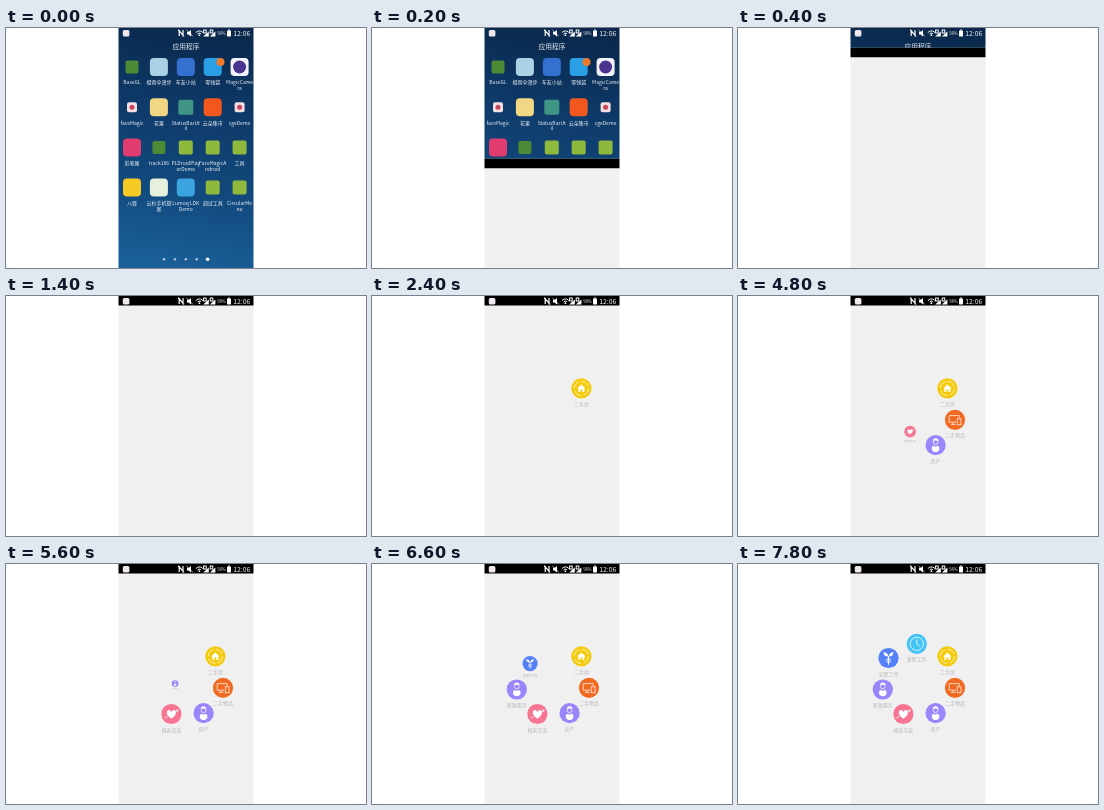
Recreate the animation shown at these times as an HTML page with a canvas. Size 360 px wide and 240 px high, loop 8000 ms.

```html
<!DOCTYPE html>
<html lang="zh">
<head>
<meta charset="utf-8">
<title>Circular menu</title>
<style>
html, body { margin: 0; width: 100%; height: 100%; overflow: hidden; background: #fff; }
canvas { display: block; width: 360px; height: 240px; }
</style>
</head>
<body>
<canvas id="stage"></canvas>
<script>
const LOOP = 8000, STEP = 200;
const LEFT = 112.5, RIGHT = 247.5, HEIGHT = 240, BAR = 9.4;
const CENTER = { x: 181, y: 116.5 };
const GROW = 350;
const FONT = '"Noto Sans CJK SC", "Noto Sans CJK", "Noto Sans", sans-serif';

const canvas = document.getElementById('stage');
const ctx = canvas.getContext('2d');
const ratio = window.devicePixelRatio || 1;
canvas.width = 360 * ratio;
canvas.height = 240 * ratio;

function text(str, x, y, size, color, weight = 400) {
  ctx.font = `${weight} ${size}px ${FONT}`;
  ctx.textAlign = 'center';
  ctx.textBaseline = 'middle';
  ctx.fillStyle = color;
  ctx.fillText(str, x, y);
}

function box(x, y, w, h, color, r = 0) {
  ctx.fillStyle = color;
  ctx.beginPath();
  ctx.roundRect(x, y, w, h, r);
  ctx.fill();
}

function disc(x, y, r, color) {
  ctx.fillStyle = color;
  ctx.beginPath();
  ctx.arc(x, y, r, 0, Math.PI * 2);
  ctx.fill();
}

function ring(x, y, r, from = 0, to = Math.PI * 2) {
  ctx.beginPath();
  ctx.arc(x, y, r, from, to);
  ctx.stroke();
}

function shape(path, fill = true) {
  const p = new Path2D(path);
  if (fill) ctx.fill(p); else ctx.stroke(p);
}

// Launcher: [label, second line, colour, size]
const GREEN = '#8fb93c', DARK_GREEN = '#4d8a35';
const apps = [
  ['BaseGL', '', DARK_GREEN, 13],
  ['橙雨伞漫步', '', '#a9d3e4', 18],
  ['车友小站', '', '#3470cf', 18],
  ['零钱袋', '', '#2b9fe6', 18],
  ['MagicCame', 'ra', '#f4f2fa', 18],
  ['faceMagic', '', '#f3dfe2', 10],
  ['花果', '', '#f1d683', 18],
  ['StatusBarUt', 'il', '#3f9484', 15],
  ['云朵集市', '', '#f2571d', 18],
  ['cgeDemo', '', '#f3dfe2', 10],
  ['彩笔屋', '', '#e23b70', 18],
  ['track186', '', DARK_GREEN, 13],
  ['PLDroidPlay', 'erDemo', GREEN, 14],
  ['FaceMagicA', 'ndroid', GREEN, 14],
  ['工具', '', GREEN, 14],
  ['八驿', '', '#f6c923', 18],
  ['云杉手机管', '家', '#e6f0dc', 18],
  ['Lumoq LDK', 'Demo', '#3ba3dd', 18],
  ['调试工具', '', GREEN, 14],
  ['CircularMe', 'nu', GREEN, 14]
];

function drawLauncher() {
  const sky = ctx.createLinearGradient(200, 0, 160, HEIGHT);
  sky.addColorStop(0, '#0a284b');
  sky.addColorStop(0.35, '#0e3a69');
  sky.addColorStop(0.7, '#124b80');
  sky.addColorStop(1, '#1a6099');
  box(112, 0, 136, HEIGHT, sky);

  text('应用程序', 180, 18.8, 6.8, '#e8edf4', 500);
  apps.forEach(([label, more, color, size], i) => {
    const x = 126 + (i % 5) * 26.9;
    const y = 39 + Math.floor(i / 5) * 40.2;
    box(x - size / 2, y - size / 2, size, size, color, size > 15 ? 4 : 2);
    text(label, x, y + 15.4, 5, '#eef3f8');
    if (more) text(more, x, y + 21.2, 5, '#eef3f8');
  });
  disc(233.6, 39, 6.5, '#4a348f');
  disc(214.5, 34, 4, '#f07a2c');
  disc(126, 79.2, 2.5, '#c9455c');
  disc(233.6, 79.2, 2.5, '#c9455c');
  for (let i = 0; i < 5; i++) {
    disc(158 + i * 10.9, 231.3, i === 4 ? 1.8 : 1.3, i === 4 ? '#fff' : '#a9c2da');
  }
}

function drawStatus() {
  ctx.strokeStyle = '#fff';
  box(116.8, 2, 6.6, 6.4, '#f0e6ee', 1.5);

  // NFC and mute
  ctx.lineWidth = 1.2;
  shape('M173.2 8V2.6L177 7.4V2M172 2.4h1.4M176.6 8h1.6', false);
  ctx.fillStyle = '#fff';
  shape('M181 4h1.5l2.5-2v6.4l-2.5-2H181z');
  ctx.lineWidth = 0.8;
  shape('M180.6 2.2l6 5.8', false);

  // Wi-Fi
  ctx.lineWidth = 1;
  for (const r of [2.2, 4.4]) ring(193.4, 7.3, r, Math.PI * 1.2, Math.PI * 1.8);
  disc(193.4, 7.2, 0.9, '#fff');

  // Two signal meters
  for (const x of [197.2, 203.8]) {
    ctx.fillStyle = '#fff';
    shape(`M${x} 8.4L${x + 5.6} 3.4V8.4z`);
    ctx.strokeRect(x + 0.4, 2, 2.6, 3);
  }
  text('98%', 215.4, 5.2, 4.2, '#e4e4e4');
  box(221, 2.4, 4, 6, '#fff', 0.6);
  box(222.1, 1.6, 1.8, 1, '#fff');
  text('12:06', 235.7, 5.1, 6.8, '#f4f4f4');
}

// Glyphs drawn around (0, 0) inside a disc of radius 10
function house() {
  ctx.lineWidth = 0.7;
  ctx.setLineDash([8.5, 2.5]);
  ring(0, 0, 7);
  ctx.setLineDash([]);
  shape('M-4.2 .2L0-3.8 4.2 .2H3V3.6H1V1H-1V3.6H-3V.2z');
}

function devices() {
  ctx.lineWidth = 0.7;
  shape('M1 2.4H-5.8V-4.2H4.2V-1.8M-2.2 2.6V4.4M-4 4.6H.6', false);
  ctx.strokeRect(2.2, -1, 3.8, 6);
}

function keeper() {
  ctx.lineWidth = 0.7;
  ring(0, -3, 2.4);
  shape('M-2.8-4.2Q-2.6-7 0-7T2.8-4.2Q0-5.6-2.8-4.2z');
  shape('M-3.8 4Q-4 .6-1.4 .6L0 1.8 1.4 .6Q4 .6 3.8 4 3 6.8 0 6.8T-3.8 4z');
}

function heart() {
  shape('M0 4.8C-7.5-.2-4.2-5 -1.6-3.8Q-.4-3.2 0-1.8 .4-3.2 1.6-3.8C4.2-5 7.5-.2 0 4.8z');
  ctx.lineWidth = 0.8;
  shape('M-6.8 4L-3.8 2.4M3.8-2L6.8-3.8M5-4L6.8-3.8 6-2.2', false);
}

function sprout() {
  shape('M-.2-1.6Q-4.8-1.4-5-5.8-1-5.8-.2-1.6zM.2-1.6Q1-5.8 5-5.8 4.8-1.4 .2-1.6z');
  ctx.lineWidth = 0.9;
  shape('M0-2V6.8', false);
  ring(0, 2.4, 1.9);
}

function clock() {
  ctx.lineWidth = 0.8;
  ring(0, 0, 6.6);
  shape('M0-4.4V.2L3 2.6', false);
}

const items = [
  { x: 209.4, y: 92.4, start: 1775, color: '#f4cb0c', label: '二手房', glyph: house },
  { x: 217, y: 123.8, start: 2705, color: '#f06a22', label: '二手物品', glyph: devices },
  { x: 197.6, y: 149.2, start: 3625, color: '#9b85fb', label: '房产', glyph: keeper },
  { x: 165.4, y: 150, start: 4600, color: '#f77592', label: '相亲交友', glyph: heart },
  { x: 144.8, y: 125.5, start: 5485, color: '#9b85fb', label: '家政服务', glyph: keeper },
  { x: 150.5, y: 94, start: 6337, color: '#5580f7', label: '全职工作', glyph: sprout },
  { x: 178.8, y: 79.8, start: 7200, color: '#43c3f6', label: '兼职工作', glyph: clock }
];

function drawItem(item, time) {
  const s = Math.min(1, (time - item.start) / GROW);
  if (s <= 0) return;
  ctx.save();
  ctx.translate(CENTER.x + (item.x - CENTER.x) * s, CENTER.y + (item.y - CENTER.y) * s);
  ctx.scale(s, s);
  disc(0, 0, 10.1, item.color);
  ctx.fillStyle = ctx.strokeStyle = '#fff';
  item.glyph();
  text(item.label, 0, 15.6, 5, '#b8b8b8');
  ctx.restore();
}

function draw(time) {
  ctx.setTransform(ratio, 0, 0, ratio, 0, 0);

  // The app window slides up over the launcher
  const p = Math.min(1, Math.max(0, (time - 100) / 500));
  const top = HEIGHT * Math.pow(1 - p, 2.72);

  if (top > 0) drawLauncher();
  box(112, top, 136, HEIGHT, '#f0f0f0');
  box(112, top, 136, BAR, '#000');
  drawStatus();
  for (const item of items) drawItem(item, time);

  // White margins beside the phone screen
  box(0, 0, LEFT, HEIGHT, '#fff');
  box(RIGHT, 0, 360 - RIGHT, HEIGHT, '#fff');
}

const began = performance.now();
function tick() {
  const time = (performance.now() - began) % LOOP;
  draw(Math.floor(time / STEP) * STEP);
  requestAnimationFrame(tick);
}
tick();
</script>
</body>
</html>
```
